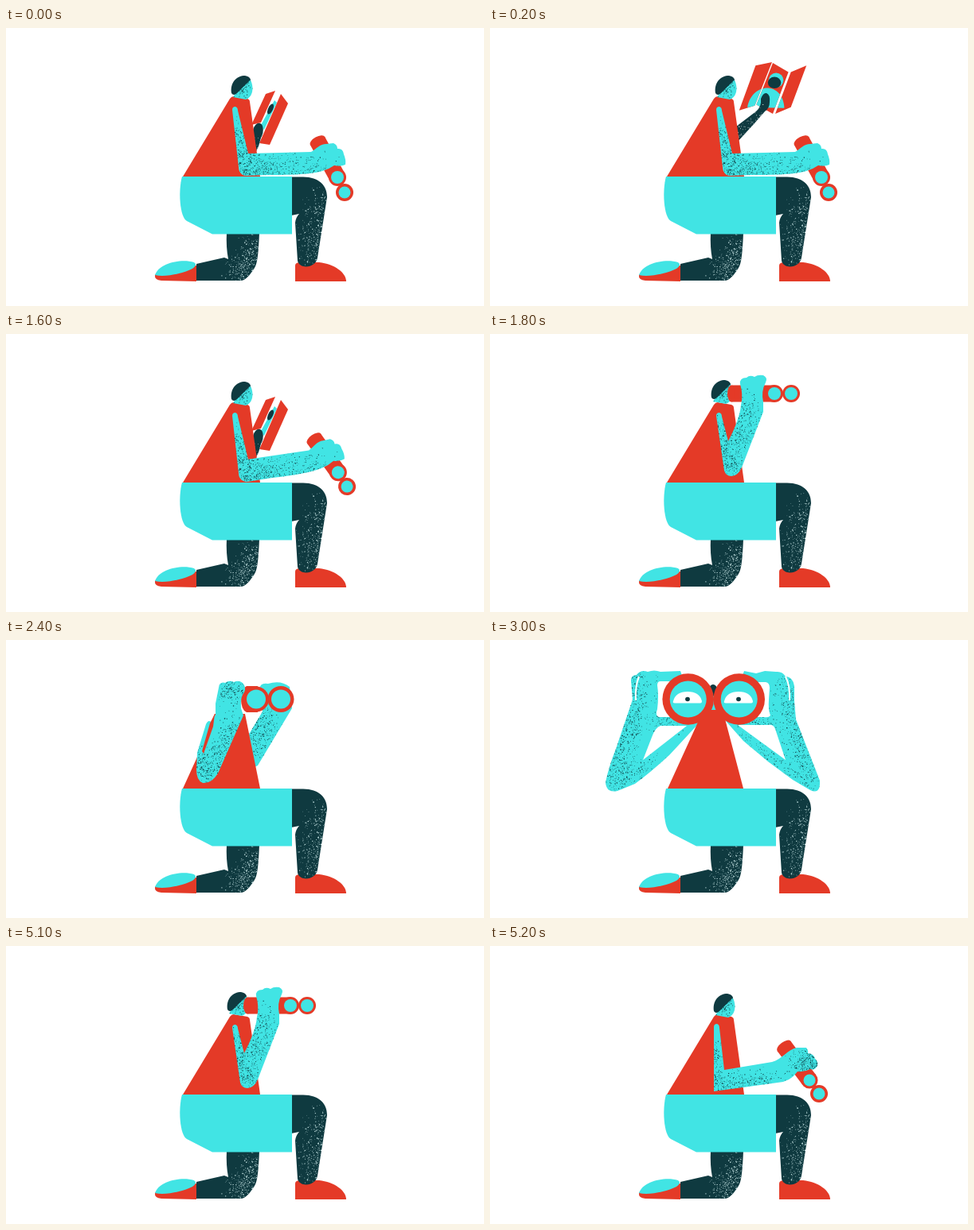
Write an HTML page with a canvas that moves like this. It is 600 by 350 pixels and loops after 5.3 s.

```html
<!DOCTYPE html>
<html lang="en">
<head>
<meta charset="utf-8">
<title>Lookout</title>
<style>
html, body { margin: 0; width: 100%; height: 100%; overflow: hidden; background: #fff; }
canvas { display: block; width: 600px; height: 350px; }
</style>
</head>
<body>
<canvas id="stage" width="600" height="350"></canvas>
<script>
const ctx = document.getElementById('stage').getContext('2d');
const RED = '#e43a27', CYAN = '#41e4e4', DARK = '#0f3a40', WHITE = '#fff', PALE = '#c9e6e6';
const LOOP = 5300;

function fill(d, color) {
  const path = new Path2D(d);
  ctx.fillStyle = color;
  ctx.fill(path);
  return path;
}

function oval(x, y, rx, ry, color, turn = 0) {
  ctx.fillStyle = color;
  ctx.beginPath();
  ctx.ellipse(x, y, rx, ry, turn, 0, Math.PI * 2);
  ctx.fill();
}

function group(draw, x = 0, y = 0, turn = 0, sx = 1, sy = 1) {
  ctx.save();
  ctx.translate(x, y);
  ctx.rotate(turn);
  ctx.scale(sx, sy);
  ctx.translate(-x, -y);
  draw();
  ctx.restore();
}

function shift(dx, dy, draw) {
  ctx.save();
  ctx.translate(dx, dy);
  draw();
  ctx.restore();
}

function random(seed) {
  return () => {
    seed = (seed * 1664525 + 1013904223) >>> 0;
    return seed / 4294967296;
  };
}

// Sprays grains around a segment, kept inside the path.
function spray(path, color, count, x0, y0, x1, y1, spread) {
  const rnd = random(x0 * 971 + y0 * 53 + count);
  ctx.save();
  ctx.clip(path);
  ctx.fillStyle = color;
  for (let i = 0; i < count; i++) {
    const k = rnd();
    const dx = (rnd() + rnd() + rnd() - 1.5) * spread;
    const dy = (rnd() + rnd() + rnd() - 1.5) * spread;
    const size = 0.5 + rnd() * rnd() * 0.9;
    ctx.fillRect(x0 + (x1 - x0) * k + dx, y0 + (y1 - y0) * k + dy, size, size);
  }
  ctx.restore();
}

function legs() {
  fill('M187 311Q190 303 239 299V319L195 318Q186 317 187 311Z', RED);
  fill('M187 311C192 296 220 290 236 295Q241 298 234 303C222 309 200 314 187 311Z', CYAN);
  const back = fill('M277 258H318C317 280 316 296 312 302Q302 318 295 318H239V297L274 289L279 291Q276 275 277 258Z', DARK);
  spray(back, PALE, 260, 312, 268, 304, 302, 19);
  spray(back, PALE, 150, 300, 300, 286, 314, 17);
  fill('M363 319V299Q363 295 370 295H393C412 297 427 308 427 319Z', RED);
  const front = fill('M358 187.5H373C393 188 403 198 403 213L391 289C389 303 368 304 366 293L363 245Q364 238 368 234L358 236Z', DARK);
  spray(front, PALE, 420, 397, 215, 384, 290, 21);
  fill('M221 187H359V259.5H259L227 243C218 238 216 205 221 187Z', CYAN);
}

function shirt() {
  fill('M281 89Q283 86 286 86L303 89Q306 90 306 93L319 187H222Z', RED);
}

function head() {
  const face = fill('M306 64C312 74 310 87 301 90L285 87L290 79Z', CYAN);
  spray(face, DARK, 80, 293, 82, 306, 68, 8);
  fill('M283 82C281 68 290 60 300 60Q306 61 307 65L292 80Q286 87 283 82Z', DARK);
}

function ring(x, y, r, inner) {
  oval(x, y, r, r, RED);
  oval(x, y, inner, inner, CYAN);
}

function tube(x0, y0, x1, y1) {
  ctx.strokeStyle = RED;
  ctx.lineWidth = 21;
  ctx.beginPath();
  ctx.moveTo(x0, y0);
  ctx.lineTo(x1, y1);
  ctx.stroke();
  oval(x0, y0, 5, 10.5, RED, Math.atan2(y1 - y0, x1 - x0));
}

function lowArm(turn = 0) {
  const upper = fill('M284 103Q284 99 288 99Q291 100 291 104L304 158L316 178Q305 188 296 184Q292 181 292 175Z', CYAN);
  spray(upper, DARK, 260, 290, 125, 296, 180, 14);
  group(() => {
    tube(391, 142, 416, 188);
    const fore = fill('M304 158L383 156C390 152 394 146 402 146L411 145Q416 147 416 152Q423 151 424 159Q427 166 426 172Q420 175 412 173Q405 178 397 180C380 185 350 185 330 185L300 186Q292 184 293 174Z', CYAN);
    spray(fore, DARK, 380, 296, 176, 318, 178, 24);
    spray(fore, DARK, 380, 315, 183, 400, 178, 20);
    ring(416, 188, 11, 8);
    ring(425, 207, 11, 7.5);
  }, 302, 174, turn);
}

function restArm() {
  tube(369, 126, 401, 169);
  const arm = fill('M281 102Q281 98 285 98Q288 99 288 103L294 156L354 146C366 143 374 130 385 128L397 128Q400 132 399 135Q407 136 408 142Q412 145 411 150Q409 157 402 155Q394 159 386 158Q377 171 361 172L281 183Z', CYAN);
  spray(arm, DARK, 160, 282, 125, 283, 178, 9);
  spray(arm, DARK, 380, 285, 179, 355, 168, 18);
  spray(arm, DARK, 360, 390, 148, 408, 146, 18);
  ring(401, 169, 10.5, 7.5);
  ring(413, 186, 11, 7.5);
}

function highArm() {
  tube(303, 75, 357, 75);
  ring(357, 75, 11, 8);
  ring(378, 75, 11, 8);
  const arm = fill('M284 103Q284 99 288 99Q291 100 291 104L299 135Q313 108 315 90Q318 76 314 63Q313 55 322 55Q326 51 332 54Q336 51 343 52Q349 55 346 61Q340 72 343 86V98L316 168Q311 179 303 179Q296 179 294 172Z', CYAN);
  spray(arm, DARK, 240, 288, 112, 296, 160, 13);
  spray(arm, DARK, 330, 324, 85, 316, 145, 19);
  spray(arm, DARK, 130, 300, 160, 310, 174, 16);
}

function foldedMap() {
  fill('M326 83L338 79L320 119L308 122Z', RED);
  fill('M337 91L340 94L324 128L319 124Z', CYAN);
  oval(332, 102, 3, 7, DARK, 0.45);
  fill('M345 83L354 95L331 147L318 145Z', RED);
  oval(316, 131, 6.5, 11.5, DARK, 0.2);
  const arm = fill('M309 137L320 138L317 149L313 157H309Z', DARK);
  spray(arm, WHITE, 35, 314, 144, 314, 156, 10);
}

function openMap() {
  const panels = 'M334 52L354 48L333 101L314 107ZM355 49L374 60L355 111L335 100ZM377 60L396 52L377 103L358 111Z';
  const sheet = fill(panels, RED);
  ctx.save();
  ctx.clip(sheet);
  oval(359, 70, 9, 9, CYAN);
  oval(357, 73, 8, 7, DARK);
  fill('M324 103C329 73 367 70 369 104Z', CYAN);
  ctx.restore();
}

function mapArm() {
  const arm = fill('M309 127L334 108Q341 102 340 92Q343 84 347 85Q352 87 351 96Q351 104 345 108L332 123L310 147Z', DARK);
  spray(arm, WHITE, 140, 313, 139, 340, 116, 17);
}

function kneel(arm, map) {
  legs();
  if (map) map();
  shirt();
  head();
  arm();
}

function raised(turn = 0) {
  legs();
  shirt();
  shift(-5, -2, head);
  group(highArm, 303, 170, turn);
}

function turning() {
  legs();
  const far = fill('M318 62Q319 53 329 55Q345 50 356 59L359 86L316 158L308 162L303 122L322 90Z', CYAN);
  spray(far, DARK, 320, 325, 95, 314, 135, 20);
  fill('M262 93H300L319 187H222L242 143Z', RED);
  fill('M302 58H316V91H302Q295 88 295 74Q295 61 302 58Z', RED);
  ring(314, 74.5, 16, 12);
  ring(345, 74.5, 16.5, 12);
  const near = fill('M263 80L267 60Q268 52 275 54Q280 50 286 53Q292 50 297 54Q302 60 299 66Q294 71 295 86L298 95L266 168Q258 181 247 180Q239 177 239 163L240 142L251 106Q254 100 257 103L263 94Z', CYAN);
  fill('M262 93L260 109L248 143L246 140L256 105Z', RED);
  spray(near, DARK, 200, 270, 66, 293, 57, 18);
  spray(near, DARK, 330, 287, 100, 259, 166, 16);
  spray(near, DARK, 200, 242, 145, 250, 174, 15);
}

function frontArm(shape, gaps, crease) {
  const arm = fill(shape, CYAN);
  ctx.strokeStyle = WHITE;
  ctx.lineWidth = 2;
  ctx.stroke(new Path2D(crease));
  return () => fill(gaps, WHITE);
}

function frontArms() {
  const left = fill('M179 75L177 51Q177 44 184 44Q189 37 198 40Q206 37 214 40L239 39L262 105L225 145Q200 168 182 181L160 190Q146 193 145 179Q149 160 158 137Z', CYAN);
  spray(left, DARK, 650, 172, 90, 148, 182, 26);
  spray(left, DARK, 300, 184, 46, 176, 95, 22);
  spray(left, DARK, 170, 153, 183, 210, 153, 17);
  spray(left, DARK, 110, 206, 101, 235, 104, 14);
  const right = fill('M382 77L382 58Q380 46 371 46Q367 39 359 40L345 39L334 42L319 39L296 102L318 127L349 153L380 176L402 189Q415 195 414 177L384 100Z', CYAN);
  spray(right, DARK, 500, 380, 95, 411, 180, 22);
  spray(right, DARK, 230, 373, 48, 379, 100, 20);
  spray(right, DARK, 200, 310, 116, 400, 184, 16);
  spray(right, DARK, 90, 325, 104, 350, 102, 14);
  fill('M192 151L204 120Q208 110 214 108H247Z', WHITE);
  fill('M371 151L358 112Q356 106 349 107L311 107Z', WHITE);
  fill('M214 52H232V97H212Q207 95 210 87Q212 70 210 57Q210 52 214 52Z', WHITE);
  fill('M330 53H346Q351 54 351 60L350 75Q349 88 352 95Q350 98 344 97H330Z', WHITE);
  ctx.strokeStyle = WHITE;
  ctx.lineWidth = 2;
  ctx.stroke(new Path2D('M187 46Q182 58 183 76M371 46Q377 58 376 76'));
}

function eye(open, look) {
  ctx.save();
  ctx.beginPath();
  ctx.arc(249, 74.5, 22.5, 0, Math.PI * 2);
  ctx.clip();
  group(() => fill('M230 77Q233 65 248 65Q263 65 266 77Q266 79.5 264 79.5H232Q229 79.5 230 77Z', WHITE), 248, 76, 0, 1, open);
  if (open > 0.6) oval(248 + look, 74.5, 2.9, 2.7, DARK);
  ctx.restore();
}

function front(open = 0, look = 0) {
  legs();
  frontArms();
  oval(280, 69, 7, 13, DARK);
  oval(280, 81, 6, 11, CYAN);
  fill('M268 88H292L318 187H223Z', RED);
  for (const dx of [0, 64]) {
    shift(dx, 0, () => {
      ring(248.7, 74.5, 32.3, 23);
      if (open) eye(open, look);
    });
  }
}

const held = () => { openMap(); mapArm(); };
const halfOpen = () => group(held, 322, 130, 0, 0.72, 0.8);
const wide = () => {
  shift(0, -4, () => group(openMap, 355, 80, 0, 1.03, 1.03));
  shift(0, -3, mapArm);
};

const poses = [
  [0, () => kneel(lowArm, foldedMap)],
  [100, () => kneel(lowArm, halfOpen)],
  [200, () => kneel(lowArm, wide)],
  [1400, () => kneel(lowArm, held)],
  [1600, () => kneel(() => lowArm(-0.12), foldedMap)],
  [1700, () => kneel(() => lowArm(-0.6))],
  [1800, () => raised()],
  [1900, () => raised(-0.03)],
  [2000, () => raised()],
  [2400, turning],
  [2500, () => front()],
  [2800, () => front(0.35)],
  [2900, () => front(1.12)],
  [3000, () => front(1)],
  [3400, () => front(1, -6)],
  [3500, () => front(1, -11)],
  [4000, () => front(1, 0)],
  [4100, () => front(1, 9)],
  [5100, () => raised()],
  [5200, () => {
    legs();
    shirt();
    shift(-2, 0, head);
    restArm();
  }]
];

let shown = -1;
const start = performance.now();

function frame() {
  const t = (performance.now() - start) % LOOP;
  let i = poses.length - 1;
  while (poses[i][0] > t) i--;
  if (i !== shown) {
    shown = i;
    ctx.fillStyle = WHITE;
    ctx.fillRect(0, 0, 600, 350);
    poses[i][1]();
  }
  requestAnimationFrame(frame);
}
frame();
</script>
</body>
</html>
```
